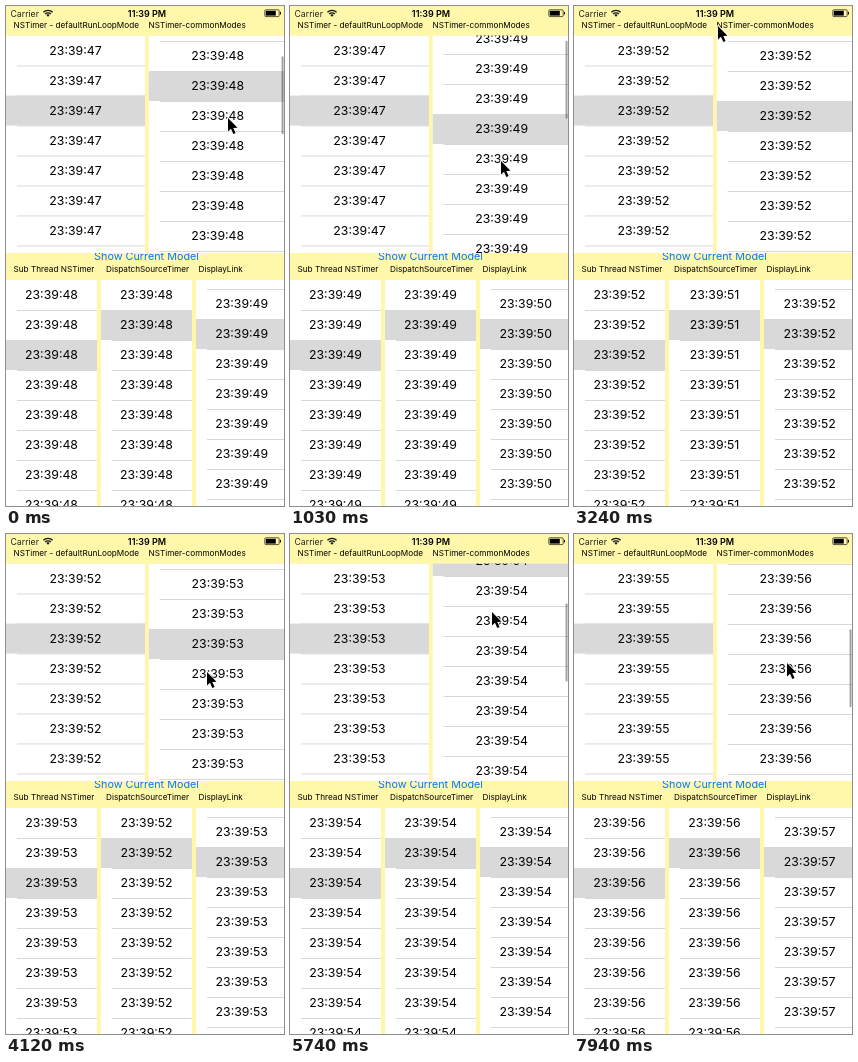
Animation of 278x500 px, one loop 8000 ms. Source, as an HTML page with a canvas:

```html
<!DOCTYPE html>
<html lang="en">
<head>
<meta charset="utf-8">
<title>Timer comparison</title>
<style>
html, body { margin: 0; width: 100%; height: 100%; overflow: hidden; background: #fff7aa; }
canvas { display: block; width: 278px; height: 500px; }
</style>
</head>
<body>
<canvas id="stage"></canvas>
<script>
const canvas = document.getElementById("stage");
const ctx = canvas.getContext("2d");
const ratio = window.devicePixelRatio || 1;
canvas.width = 278 * ratio;
canvas.height = 500 * ratio;

const LOOP = 8000, STEP = 147, ROW = 30;
const FONT = "Inter, Roboto, sans-serif";

// Periods in which the user holds the list and the default-mode timer stalls.
const drags = [[-1500, 1300], [4500, 6050], [7050, 9000]];

// Keys: time, then values.
const cursorKeys = [
  [0, 222, 112], [1029, 211, 155], [1300, 208, 142], [1600, 206, 140],
  [2205, 142, 17], [3300, 144, 20], [3528, 146, 24], [4116, 201, 138],
  [4263, 201, 161], [4500, 201, 161], [5733, 202, 78], [6050, 204, 44],
  [6615, 207, 155], [6909, 207, 155], [7050, 208, 167], [7938, 213, 129]
];
const scrollKeys = [
  [0, 55], [1029, 12], [1300, 25], [4500, 25], [5733, 108],
  [6050, 142], [7050, 142], [7938, 180]
];

function track(keys, t) {
  const next = keys.findIndex(key => key[0] > t);
  if (next < 0) return keys[keys.length - 1].slice(1);
  const a = keys[next - 1], b = keys[next];
  const u = (t - a[0]) / (b[0] - a[0]);
  const eased = u * u * (3 - 2 * u);
  return a.slice(1).map((v, i) => v + (b[i + 1] - v) * eased);
}

const clock = t => "23:39:" + Math.floor(49 + (t + 170) / 1000);
const lastTick = (t, phase) => Math.floor((t - phase) / 1000) * 1000 + phase;

function stalledTick(t, phase) {
  let fired = lastTick(t, phase);
  for (const [start, end] of drags) {
    if (t >= start) fired = t < end ? lastTick(start, phase) : Math.max(fired, end);
  }
  return fired;
}

function text(string, x, y, size, { align = "left", color = "#000", weight = 400 } = {}) {
  ctx.font = `${weight} ${size}px ${FONT}`;
  ctx.textAlign = align;
  ctx.fillStyle = color;
  ctx.fillText(string, x, y);
}

function rect(x, y, w, h, color) {
  ctx.fillStyle = color;
  ctx.fillRect(x, y, w, h);
}

function table({ x, y, w, h, top, selected, center, label }) {
  ctx.save();
  ctx.beginPath();
  ctx.rect(x, y, w, h);
  ctx.clip();
  rect(x, y, w, h, "#fff");
  for (let i = 0; i < 20; i++) rect(x + 11, top + (i + 1) * ROW, w, 0.7, "#c8c7cc");
  rect(x, top + selected * ROW, w, ROW, "#d9d9d9");
  for (let i = 0; i < 20; i++) {
    text(label, center, top + i * ROW + 19.4, 12.3, { align: "center" });
  }
  ctx.restore();
}

function statusBar() {
  text("Carrier", 4.5, 10.8, 8.7, { color: "#222" });
  text("11:39 PM", 141, 10.8, 9, { align: "center", weight: 600 });

  ctx.strokeStyle = ctx.fillStyle = "#111";
  ctx.lineWidth = 1.3;
  for (const radius of [4, 6.5]) {
    ctx.beginPath();
    ctx.arc(42, 10.8, radius, -Math.PI * 0.75, -Math.PI * 0.25);
    ctx.stroke();
  }
  ctx.beginPath();
  ctx.moveTo(42, 10.8);
  ctx.arc(42, 10.8, 2.4, -Math.PI * 0.75, -Math.PI * 0.25);
  ctx.fill();

  ctx.lineWidth = 0.7;
  ctx.beginPath();
  ctx.roundRect(258.8, 3.8, 14.4, 6.8, 1.2);
  ctx.stroke();
  rect(259.8, 4.8, 10, 4.8, "#000");
  rect(274, 5.9, 1, 2.6, "#111");
}

function scrollBar(offset, alpha) {
  ctx.fillStyle = `rgba(0, 0, 0, ${0.38 * alpha})`;
  ctx.beginPath();
  ctx.roundRect(275.6, 30.5 + offset * 0.36, 1.9, 78, 1);
  ctx.fill();
}

function pointer(x, y) {
  ctx.save();
  ctx.translate(x, y);
  ctx.beginPath();
  ctx.moveTo(0, 0);
  for (const [px, py] of [[0, 13.5], [3, 10.8], [5.3, 16], [7.6, 15], [5.3, 10], [9.5, 9.7]]) {
    ctx.lineTo(px, py);
  }
  ctx.closePath();
  ctx.lineJoin = "round";
  ctx.lineWidth = 1.6;
  ctx.strokeStyle = "#fff";
  ctx.stroke();
  ctx.fillStyle = "#000";
  ctx.fill();
  ctx.restore();
}

function draw(t) {
  const [offset] = track(scrollKeys, t);
  ctx.setTransform(ratio, 0, 0, ratio, 0, 0);
  rect(0, 0, 278, 500, "#fff7aa");
  statusBar();

  text("NSTimer - defaultRunLoopMode", 7.5, 21.6, 8.2);
  text("NSTimer-commonModes", 142.5, 21.6, 8.2);
  text("Show Current Model", 140.5, 253.8, 10.8, { align: "center", color: "#007aff" });
  text("Sub Thread NSTimer", 7.5, 266.2, 8.2);
  text("DispatchSourceTimer", 100, 266.2, 8.2);
  text("DisplayLink", 192.5, 266.2, 8.2);

  const upper = { y: 29.5, h: 217.5 };
  const lower = { y: 274, h: 226 };
  table({ ...upper, x: 0, w: 139, top: 29.6, selected: 2, center: 69.5,
    label: clock(stalledTick(t, 180)) });
  table({ ...upper, x: 142.5, w: 135.5, top: 30 - offset, selected: 3, center: 211.7,
    label: clock(lastTick(t, 100)) });
  table({ ...lower, x: 0, w: 91, top: 274, selected: 2, center: 45.5,
    label: clock(lastTick(t, 100)) });
  table({ ...lower, x: 95, w: 91, top: 274, selected: 1, center: 140.5,
    label: clock(lastTick(t, 250)) });
  table({ ...lower, x: 190, w: 88, top: 253, selected: 2, center: 235.7,
    label: clock(t) });

  const barAlpha = t < 4500 ? Math.min(1, Math.max(0, (2100 - t) / 400)) : 1;
  scrollBar(offset, barAlpha);
  pointer(...track(cursorKeys, t));
}

function frame() {
  const t = performance.now() % LOOP;
  draw(Math.floor((t + 6) / STEP) * STEP);
  requestAnimationFrame(frame);
}
frame();
</script>
</body>
</html>
```
